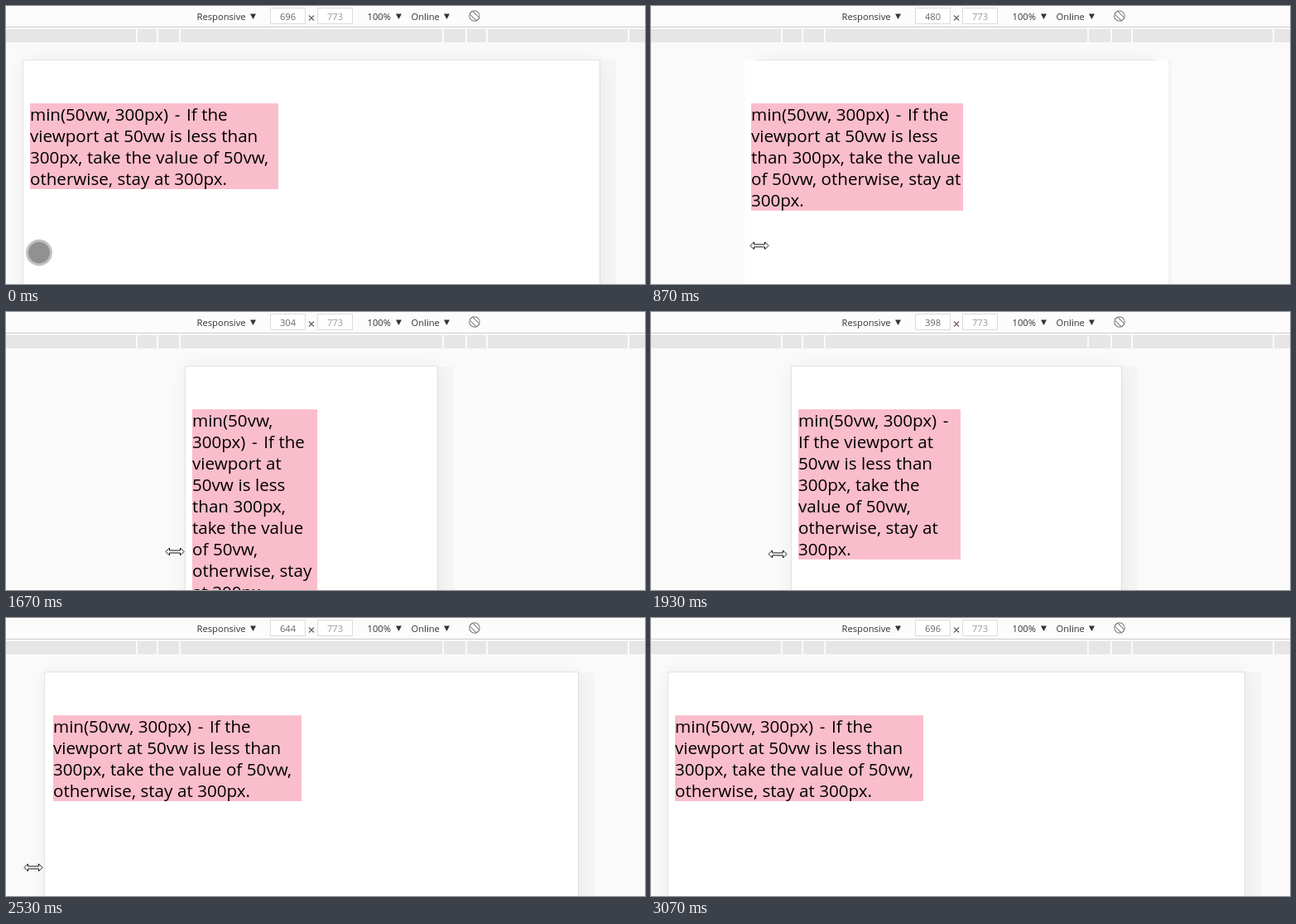
These frames come from a looping animation (772x337 px, 3.39 s). An HTML page:

```html
<!DOCTYPE html>
<html lang="en">
<head>
<meta charset="utf-8">
<title>min() in a resized viewport</title>
<style>
html, body { margin: 0; width: 100%; height: 100%; overflow: hidden; background: #fafafa; }
body { position: relative; font-family: "Open Sans", "Noto Sans", sans-serif; }
div { position: absolute; }
svg { position: absolute; left: 0; top: 0; }
.handle { top: 66px; width: 20px; height: 300px; background: rgba(0, 0, 0, .02); }
#frame { top: 66px; height: 320px; background: #fff;
  box-shadow: 0 0 0 1px #e3e3e3, 0 0 22px rgba(0, 0, 0, .06); }
#page { top: 66px; height: 320px; background: #fff; }
#note { left: 8px; top: 52px; background: #fabdcc; color: #000;
  font-size: 20.6px; line-height: 26px; word-spacing: .2px; }
#note span { padding: 0 2px; }
svg text { font-size: 11.2px; fill: #333; }
</style>
</head>
<body>
<div id="frame"></div>
<div class="handle" id="left"></div>
<div class="handle" id="right"></div>
<div id="page"><div id="note">min(50vw, 300px) <span>-</span> If the viewport at 50vw is less than 300px, take the value of 50vw, otherwise, stay at 300px.</div></div>
<svg width="772" height="337" viewBox="0 0 772 337">
  <rect width="772" height="25" fill="#fcfcfc"/>
  <rect y="25" width="772" height="1" fill="#cdcdcd"/>
  <rect y="28" width="772" height="16" fill="#e6e6e6"/>
  <path d="M158 28v16m25-16v16m27-16v16m318-16v16m28-16v16m25-16v16m171-16v16" stroke="#fafafa" stroke-width="2"/>
  <g fill="#fff" stroke="#dcdcdc">
    <rect x="319.5" y="2.5" width="42" height="19"/>
    <rect x="376.5" y="2.5" width="42" height="19"/>
  </g>
  <text x="230.5" y="17">Responsive</text>
  <text x="436.5" y="17">100%</text>
  <text x="489.5" y="17">Online</text>
  <text id="size" x="340.5" y="17" text-anchor="middle" style="fill:#666"></text>
  <text x="397.5" y="17" text-anchor="middle" style="fill:#999">773</text>
  <path d="M366 11.5l6 6m0-6l-6 6" stroke="#6a5a55" stroke-width="1.1"/>
  <path d="M295 9.5h7l-3.5 6.5zM471 9.5h7l-3.5 6.5zM529 9.5h7l-3.5 6.5z" fill="#333"/>
  <g fill="none" stroke="#777" transform="translate(566 12) rotate(-45)">
    <circle r="6.2"/>
    <rect x="-2.5" y="-6" width="5" height="12" rx="1" fill="#fcfcfc"/>
  </g>
  <g id="touch">
    <circle r="16" fill="#c2c2c2"/>
    <circle r="13" fill="#919191"/>
  </g>
  <path id="arrow" d="M-11 0L-6.5 -4.5V-1.5H6.5V-4.5L11 0L6.5 4.5V1.5H-6.5V4.5Z" fill="#fff" stroke="#111"/>
</svg>
<script>
const el = id => document.getElementById(id);
const LOOP = 3390, MID = 369, FULL = 696;

const GRAB = 10, PAUSE = 24, TURN = 33, DROP = 42, END = 46;

const ramp = (n, from, to) => Math.min(1, Math.max(0, (n - from) / (to - from)));
const easeIn = (u, p) => u ** p;
const easeOut = (u, p) => 1 - (1 - u) ** p;
const even = v => Math.round(v / 2) * 2;
const start = n => Math.round(n * 20 / 3) * 10;

function tickAt(t) {
  const n = Math.floor(t * .015) + 1;
  return Math.min(END, start(n) > t ? n - 1 : n);
}

// shrink quickly, then widen in two strokes
const widthAt = n => FULL
  - 400 * easeOut(ramp(n, GRAB, 21), 2.435)
  + 260 * easeIn(ramp(n, PAUSE, TURN), 1.593)
  + 140 * easeOut(ramp(n, TURN, DROP), 1.223);

// the pointer runs a little ahead of the frame's left edge
function pointerAt(n) {
  const approach = easeOut(ramp(n, 0, 6), 2);
  const edge = MID - widthAt(n + .45) / 2;
  return {
    x: edge - 10 + 29 * (1 - approach) - 30 * easeIn(ramp(n, DROP, DROP + 2), 2),
    y: 299 - 9 * approach + 12 * easeIn(ramp(n, PAUSE, TURN), 2.3)
  };
}

function place(id, x, width) {
  el(id).style.left = x + "px";
  if (width) el(id).style.width = width + "px";
}

const show = (id, on) => { el(id).style.display = on ? "" : "none"; };

function draw(t) {
  const n = tickAt(t), pointer = pointerAt(n);
  const frame = even(widthAt(n)), x = MID - frame / 2;

  // the page repaints late, and keeps to the left edge while it widens
  const page = even(widthAt(n - (n < PAUSE ? .55 : .2)));
  const widening = n > PAUSE && n <= TURN;

  place("frame", x, frame);
  place("left", x - 20);
  place("right", x + frame);
  place("page", widening ? x : MID - page / 2, page);
  el("note").style.width = Math.min(page / 2, 300) + "px";
  el("size").textContent = frame;

  const onHandle = pointer.x < 21 || n > GRAB;
  show("left", onHandle && frame === FULL && n < END);
  show("touch", !onHandle);
  show("arrow", onHandle);
  const at = `translate(${Math.round(pointer.x)} ${Math.round(pointer.y)})`;
  el("touch").setAttribute("transform", at);
  el("arrow").setAttribute("transform", at + " translate(0 .5)");
}

const t0 = performance.now();
function loop() {
  draw((performance.now() - t0) % LOOP);
  requestAnimationFrame(loop);
}
loop();
</script>
</body>
</html>
```
